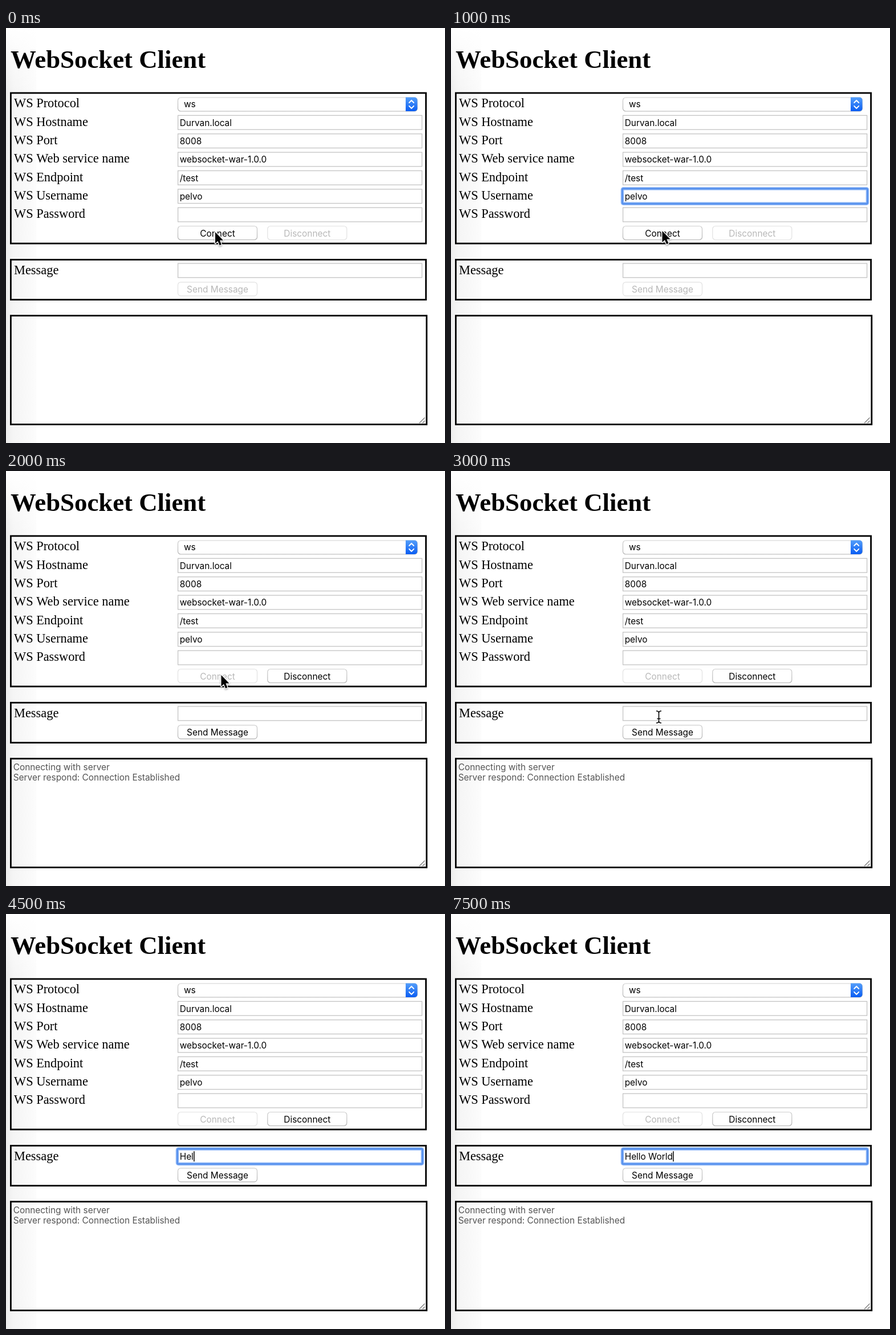
An HTML page with a canvas for the animation above (8000 ms loop, 770 by 728 pixels).

```html
<!DOCTYPE html>
<html lang="en">
<head>
<meta charset="utf-8">
<title>WebSocket Client</title>
<style>
  html, body { margin: 0; width: 100%; height: 100%; overflow: hidden; background: #fff; }
  canvas { display: block; }
</style>
</head>
<body>
<canvas id="stage" width="770" height="728"></canvas>
<script>
const ctx = document.getElementById('stage').getContext('2d');
const LOOP = 8000;
const SANS = '15.4px Inter, sans-serif';
const LABEL = '22.4px "Liberation Serif", serif';
const TITLE = 'bold 44.8px "Liberation Serif", serif';
const ROW = 32.35;

const fields = [
  ['WS Protocol'],
  ['WS Hostname', 'Durvan.local'],
  ['WS Port', '8008'],
  ['WS Web service name', 'websocket-war-1.0.0'],
  ['WS Endpoint', '/test'],
  ['WS Username', 'pelvo'],
  ['WS Password', '']
];

// Each entry holds from its time until the next one.
const pointerSteps = [
  [0, 'arrow', 367, 358], [500, 'arrow', 369, 355.5], [1000, 'arrow', 370.5, 356],
  [1500, 'arrow', 377.5, 358], [3000, 'beam', 364.5, 431.5], [4000, 'none', 0, 0]
];
const typingSteps = [
  [0, 0], [4000, 1], [4500, 3], [5000, 5], [5500, 6],
  [6000, 7], [6500, 8], [7000, 10], [7500, 11]
];
const message = 'Hello World';

const current = (steps, t) => steps.filter(step => step[0] <= t).pop();

function text(str, x, y, font = SANS, color = '#000', align = 'left') {
  ctx.font = font;
  ctx.fillStyle = color;
  ctx.textAlign = align;
  ctx.fillText(str, x, y);
}

function roundRect(x, y, w, h, r) {
  ctx.beginPath();
  ctx.roundRect(x, y, w, h, r);
}

function line(points, color, width) {
  ctx.beginPath();
  points.forEach(([x, y]) => ctx.lineTo(x, y));
  ctx.strokeStyle = color;
  ctx.lineWidth = width;
  ctx.stroke();
}

function vertical(y0, y1, from, to) {
  const g = ctx.createLinearGradient(0, y0, 0, y1);
  g.addColorStop(0, from);
  g.addColorStop(1, to);
  return g;
}

function frame(x, y, w, h) {
  ctx.strokeStyle = '#000';
  ctx.lineWidth = 2.8;
  ctx.strokeRect(x, y, w, h);
}

function background() {
  ctx.fillStyle = '#fff';
  ctx.fillRect(0, 0, 770, 728);
  const shade = ctx.createLinearGradient(0, 0, 53, 0);
  shade.addColorStop(0, '#ededed');
  shade.addColorStop(0.25, '#f5f5f5');
  shade.addColorStop(1, '#fcfcfc');
  ctx.fillStyle = shade;
  ctx.fillRect(0, 0, 53, 728);
  ctx.fillStyle = vertical(0, 110, '#fff', 'rgba(255,255,255,0)');
  ctx.fillRect(0, 0, 53, 110);
}

function input(y, value, focused, caret) {
  ctx.fillStyle = '#fff';
  ctx.fillRect(301, y, 429, 25.5);
  if (focused) {
    roundRect(300.5, y - 0.5, 430, 26.5, 2);
    ctx.strokeStyle = 'rgba(100,155,245,.5)';
    ctx.lineWidth = 6;
    ctx.stroke();
    ctx.strokeStyle = '#5b94ee';
    ctx.lineWidth = 3.4;
    ctx.stroke();
  } else {
    ctx.strokeStyle = '#c4c4c4';
    ctx.lineWidth = 1.3;
    ctx.strokeRect(301.6, y + 0.5, 428, 24.8);
  }
  text(value, 304.7, y + 18.8);
  if (caret) {
    ctx.fillRect(305 + ctx.measureText(value).width, y + 3.7, 1.5, 18);
  }
}

function button(label, x, y, state) {
  const disabled = state === 'disabled';
  const pressed = state === 'pressed';
  roundRect(x + 0.5, y + 0.5, 139, 24, 5);
  ctx.fillStyle = pressed ? vertical(y, y + 24, '#4a8ff8', '#0d5cf0') : '#fff';
  ctx.fill();
  ctx.strokeStyle = pressed ? '#2465d8'
    : disabled ? '#e2e2e2' : vertical(y, y + 24, '#d0d0d0', '#b2b2b2');
  ctx.lineWidth = 1.2;
  ctx.stroke();
  text(label, x + 70, y + 18.6, SANS, disabled ? '#b8b8b8' : '#000', 'center');
}

function select() {
  roundRect(301.5, 122, 420, 24, 5);
  ctx.fillStyle = '#fff';
  ctx.fill();
  ctx.strokeStyle = vertical(122, 146, '#d0d0d0', '#b2b2b2');
  ctx.lineWidth = 1.2;
  ctx.stroke();
  roundRect(701, 121.5, 20.5, 24.5, [0, 5, 5, 0]);
  ctx.fillStyle = vertical(121, 146, '#56a0fa', '#0a5df3');
  ctx.fill();
  ctx.lineCap = ctx.lineJoin = 'round';
  line([[707.2, 131], [711.2, 126.8], [715.2, 131]], '#fff', 1.9);
  line([[707.2, 136.8], [711.2, 141], [715.2, 136.8]], '#fff', 1.9);
  ctx.lineCap = 'butt';
  ctx.lineJoin = 'miter';
  text('ws', 312, 139.2);
}

function arrow(x, y) {
  ctx.save();
  ctx.translate(x, y);
  ctx.beginPath();
  [[0, 0], [0, 20], [4.5, 15.8], [7.6, 23.2], [11, 21.8], [7.9, 14.5], [14, 14.5]]
    .forEach(([px, py]) => ctx.lineTo(px, py));
  ctx.closePath();
  ctx.lineJoin = 'round';
  ctx.strokeStyle = '#fff';
  ctx.lineWidth = 2.6;
  ctx.shadowColor = 'rgba(0,0,0,.35)';
  ctx.shadowBlur = 3;
  ctx.shadowOffsetY = 1.5;
  ctx.stroke();
  ctx.shadowColor = 'transparent';
  ctx.fillStyle = '#000';
  ctx.fill();
  ctx.restore();
}

function beam(x, y) {
  ctx.save();
  ctx.translate(x, y);
  ctx.beginPath();
  for (const side of [-1, 1]) {
    ctx.moveTo(side * 4.5, -10.5);
    ctx.quadraticCurveTo(0, -10.5, 0, -7);
    ctx.lineTo(0, 7);
    ctx.quadraticCurveTo(0, 10.5, side * 4.5, 10.5);
  }
  ctx.moveTo(-3, 3);
  ctx.lineTo(3, 3);
  for (const [color, width] of [['#fff', 3.6], ['#000', 1.6]]) {
    ctx.strokeStyle = color;
    ctx.lineWidth = width;
    ctx.stroke();
  }
  ctx.restore();
}

function clickRing(x, y) {
  ctx.beginPath();
  ctx.arc(x, y, 29.8, 0, Math.PI * 2);
  for (const [color, width] of [['#fff', 4.6], ['#111', 2]]) {
    ctx.strokeStyle = color;
    ctx.lineWidth = width;
    ctx.stroke();
  }
}

function draw(t) {
  const connected = t >= 2000;
  const clicking = t >= 1500 && !connected;
  const userFocus = t >= 500 && t < 1500;
  const messageFocus = t >= 3500;

  background();
  text('WebSocket Client', 8, 70.3, TITLE);

  frame(8.4, 114, 728.2, 264);
  fields.forEach(([label, value], i) => {
    text(label, 14, 139.3 + ROW * i, LABEL);
    if (i === 0) select();
    else {
      const focused = i === 5 && userFocus;
      input(120.5 + ROW * i, value, focused, focused && t < 1000);
    }
  });
  button('Connect', 301, 347, connected ? 'disabled' : clicking ? 'pressed' : '');
  button('Disconnect', 458.3, 347, connected ? '' : 'disabled');

  frame(8.4, 406.4, 728.2, 70.2);
  text('Message', 14, 432, LABEL);
  input(412.5, message.slice(0, current(typingSteps, t)[1]), messageFocus, messageFocus);
  button('Send Message', 301, 445.3, connected ? '' : 'disabled');

  frame(8.4, 504.6, 729.4, 190.8);
  line([[725, 693], [734.5, 683.5]], '#777', 1.2);
  line([[730.5, 693], [734.5, 689]], '#777', 1.2);
  if (connected) {
    text('Connecting with server', 12.7, 524.5, SANS, '#545454');
    text('Server respond: Connection Established', 12.7, 542.7, SANS, '#545454');
  }

  const [, pointer, x, y] = current(pointerSteps, t);
  if (clicking) clickRing(377, 360);
  if (pointer === 'arrow') arrow(x, y);
  if (pointer === 'beam') beam(x, y);
}

const start = performance.now();
function tick() {
  draw((performance.now() - start) % LOOP);
  requestAnimationFrame(tick);
}
tick();
</script>
</body>
</html>
```
